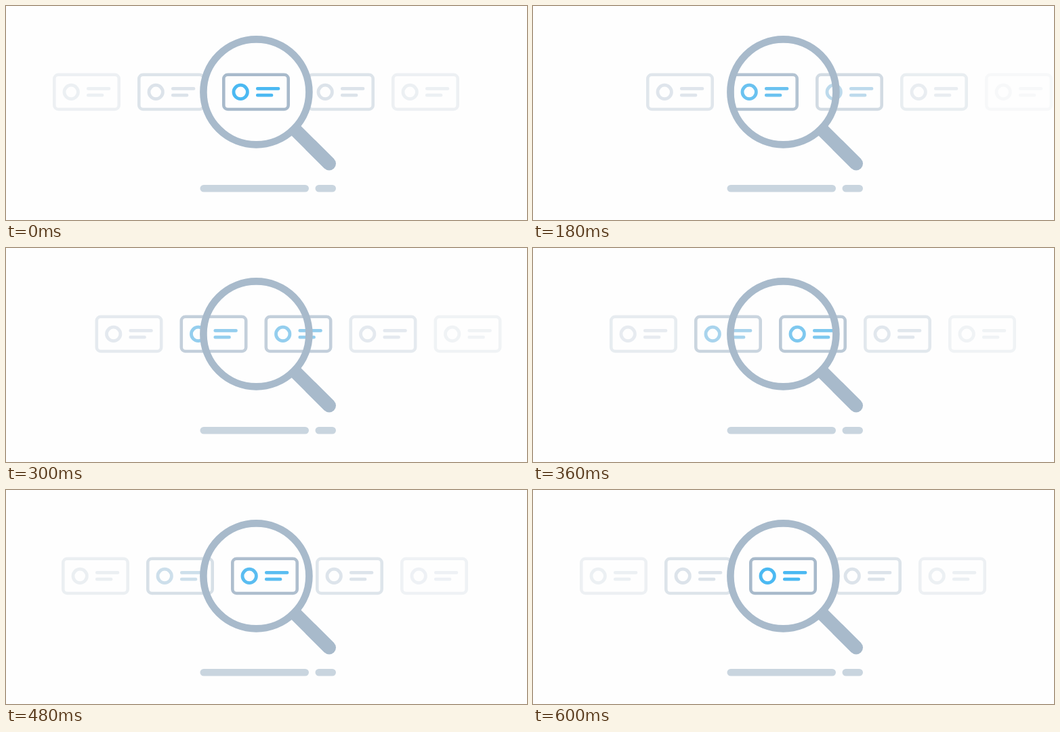
Write an HTML page without scripts that moves like this. It is 769 px wide and 317 px high and loops after 1200 ms.

```html
<!DOCTYPE html>
<html lang="en">
<head>
<meta charset="utf-8">
<title>Card search</title>
<style>
  @property --t {
    syntax: "<number>";
    inherits: true;
    initial-value: 0;
  }

  html, body {
    margin: 0;
    width: 100%;
    height: 100%;
    overflow: hidden;
    background: #fefefe;
  }

  svg {
    --steel: #a8bacb;
    --p: calc(var(--t) * var(--t) * (3 - 2 * var(--t)));
    display: block;
    width: 100%;
    height: 100%;
    fill: none;
    stroke-linecap: round;
    animation: slide 1200ms -1ms infinite;
  }

  /* Slide in 30 ms ticks, then rest for the second half. */
  @keyframes slide {
    0% { --t: 0; animation-timing-function: steps(20, end); }
    50%, 100% { --t: 1; }
  }

  /* --d: signed distance from the lens, in card slots */
  .card {
    --d: calc(var(--i) - var(--p));
    --a: max(var(--d), -1 * var(--d));
    --near: calc(100% * clamp(0, 1 - var(--a), 1));
    --fade: 1;
    transform: translateX(calc(var(--d) * 125px));
    opacity: calc(clamp(.4, 1.5 - .5 * var(--a), 1) * var(--fade));
  }
  .leaving { --fade: clamp(0, 1 - 4.5 * var(--t), 1); }
  .entering { --fade: clamp(0, 2.5 * var(--t) - .25, 1); }

  .frame {
    stroke: color-mix(in srgb, var(--steel) var(--near), #dde4ea);
    stroke-width: 4.6;
  }
  .info {
    stroke: color-mix(in srgb, #4bb9f2 var(--near), #dce3ea);
    stroke-width: 4.8;
  }

  .lens { stroke: var(--steel); }
  .ground { stroke: #c9d5df; stroke-width: 10.4; }
</style>
</head>
<body>
<svg viewBox="0 0 769 317">
  <defs>
    <g id="card">
      <rect class="frame" x="321.3" y="101.8" width="95.4" height="51.2" rx="6"/>
      <g class="info">
        <circle cx="346.2" cy="127.4" r="10.2"/>
        <path d="M371.3 122.4H402M371.3 132.2H392"/>
      </g>
    </g>
  </defs>

  <use class="card leaving" href="#card" style="--i: -2"/>
  <use class="card" href="#card" style="--i: -1"/>
  <use class="card" href="#card" style="--i: 0"/>
  <use class="card" href="#card" style="--i: 1"/>
  <use class="card" href="#card" style="--i: 2"/>
  <use class="card entering" href="#card" style="--i: 3"/>

  <g class="lens">
    <circle cx="369.4" cy="127.4" r="78" stroke-width="10.6"/>
    <path d="M428 184.5L477 233.5" stroke-width="20" stroke-linecap="butt"/>
    <path d="M450 206.5L477 233.5" stroke-width="20"/>
  </g>
  <path class="ground" d="M291.7 270.2H441.8M461.7 270.2H481.8"/>
</svg>
</body>
</html>
```
